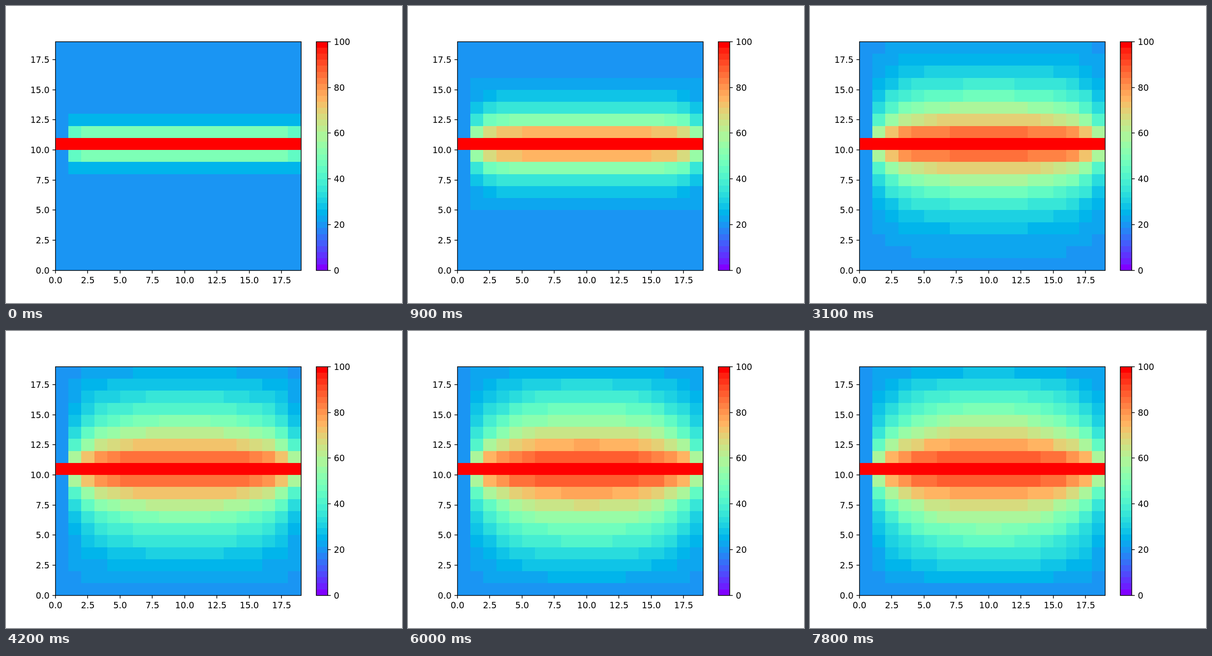
An HTML page that plays this animation: 864x648 px, repeating every 8000 ms.

```html
<!DOCTYPE html>
<html lang="en">
<head>
<meta charset="utf-8">
<title>Heat diffusion</title>
<style>
  html, body { margin: 0; width: 100%; height: 100%; overflow: hidden; background: #fff; }
  svg { display: block; width: 864px; height: 648px; }
  text { font: 18.75px "DejaVu Sans", sans-serif; fill: #000; }
  .cells rect { shape-rendering: crispEdges; }
  .frame { fill: none; stroke: #000; stroke-width: 1.5; }
</style>
</head>
<body>
<svg id="stage" viewBox="0 0 864 648"></svg>
<script>
const NS = "http://www.w3.org/2000/svg";
const stage = document.getElementById("stage");

const SIZE = 20, SHOWN = SIZE - 1, HOT_ROW = 10;
const COLD = 20, HOT = 100;
const STEP_MS = 100, LOOP_MS = 8000, FIRST_STEP = 2;
const plot = { left: 108, right: 643.68, top: 77.76, bottom: 576.72 };
const bar = { left: 677.16, right: 702.11 };

// Upper limits of the colour bands, in degrees.
const limits = [
  2.6, 5.3, 7.9, 10.6, 13.2, 15.8, 18.5, 21.15, 23.9, 26.5, 29.4, 31.8, 34.3,
  37.1, 39.8, 42.6, 45.6, 48.3, 50.6, 53.4, 56.3, 60.6, 63.2, 65.8, 68.4, 71.05,
  73.7, 76.3, 78.9, 81.6, 84.2, 86.8, 89.5, 92.1, 94.7, 97.4, 100
];

function rainbow(x) {
  const rgb = [Math.abs(2 * x - 0.5), Math.sin(Math.PI * x), Math.cos(Math.PI * x / 2)];
  return `rgb(${rgb.map(c => Math.round(255 * Math.min(1, Math.max(0, c)))).join()})`;
}

const lastBand = limits.length - 1;
const bandColors = limits.map((high, i) => {
  if (i === 0) return rainbow(0);
  if (i === lastBand) return rainbow(1);
  return rainbow((limits[i - 1] + high) / 200);
});

function colorOf(value) {
  const band = limits.findIndex(high => value < high);
  return bandColors[band < 0 ? lastBand : band];
}

function add(parent, name, attrs, content) {
  const el = document.createElementNS(NS, name);
  for (const key in attrs) el.setAttribute(key, attrs[key]);
  if (content !== undefined) el.textContent = content;
  parent.appendChild(el);
  return el;
}

function addRect(parent, left, top, right, bottom, attrs) {
  const [x, y, x2, y2] = [left, top, right, bottom].map(Math.round);
  return add(parent, "rect", { x, y, width: x2 - x, height: y2 - y, ...attrs });
}

const plotX = col => plot.left + (plot.right - plot.left) * col / SHOWN;
const plotY = row => plot.bottom - (plot.bottom - plot.top) * row / SHOWN;
const barY = value => plot.bottom - (plot.bottom - plot.top) * value / 100;

// Each interior point becomes the mean of its four neighbours.
function diffuse(grid) {
  return grid.map((line, r) => line.map((value, c) => {
    const fixed = r === HOT_ROW || r % SHOWN === 0 || c % SHOWN === 0;
    if (fixed) return value;
    return (grid[r - 1][c] + grid[r + 1][c] + line[c - 1] + line[c + 1]) / 4;
  }));
}

let grid = Array.from({ length: SIZE }, (_, r) => Array(SIZE).fill(r === HOT_ROW ? HOT : COLD));
for (let i = 0; i < FIRST_STEP; i++) grid = diffuse(grid);
const states = [];
for (let i = 0; i < LOOP_MS / STEP_MS; i++) {
  states.push(grid);
  grid = diffuse(grid);
}

const cellLayer = add(stage, "g", { class: "cells" });
const cells = Array.from({ length: SHOWN }, (_, r) => Array.from({ length: SHOWN }, (_, c) =>
  addRect(cellLayer, plotX(c), plotY(r + 1), plotX(c + 1), plotY(r))));
limits.forEach((high, i) =>
  addRect(cellLayer, bar.left, barY(high), bar.right, barY(limits[i - 1] || 0), { fill: bandColors[i] }));

addRect(stage, plot.left, plot.top, plot.right, plot.bottom, { class: "frame" });
addRect(stage, bar.left, plot.top, bar.right, plot.bottom, { class: "frame" });

const TICK = 6.56, LABEL = 13.12;
function addTick(x, y, dx, dy) {
  add(stage, "path", { class: "frame", d: `M${Math.round(x)} ${Math.round(y)}l${dx} ${dy}` });
}

for (let v = 0; v < SHOWN; v += 2.5) {
  const label = v.toFixed(1);
  const x = plotX(v), y = plotY(v);
  addTick(x, plot.bottom, 0, TICK);
  add(stage, "text", { x, y: 604.5, "text-anchor": "middle" }, label);
  addTick(plot.left, y, -TICK, 0);
  add(stage, "text", { x: plot.left - LABEL, y: y + 7, "text-anchor": "end" }, label);
}
for (let v = 0; v <= 100; v += 20) {
  addTick(bar.right, barY(v), TICK, 0);
  add(stage, "text", { x: bar.right + LABEL, y: barY(v) + 7 }, v);
}

let shown = -1;
function draw(time) {
  const index = Math.floor((time % LOOP_MS) / STEP_MS);
  if (index === shown) return;
  shown = index;
  cells.forEach((line, r) => line.forEach((cell, c) =>
    cell.setAttribute("fill", colorOf(states[index][r][c]))));
}

const start = performance.now();
function tick() {
  draw(performance.now() - start);
  requestAnimationFrame(tick);
}
tick();
</script>
</body>
</html>
```
